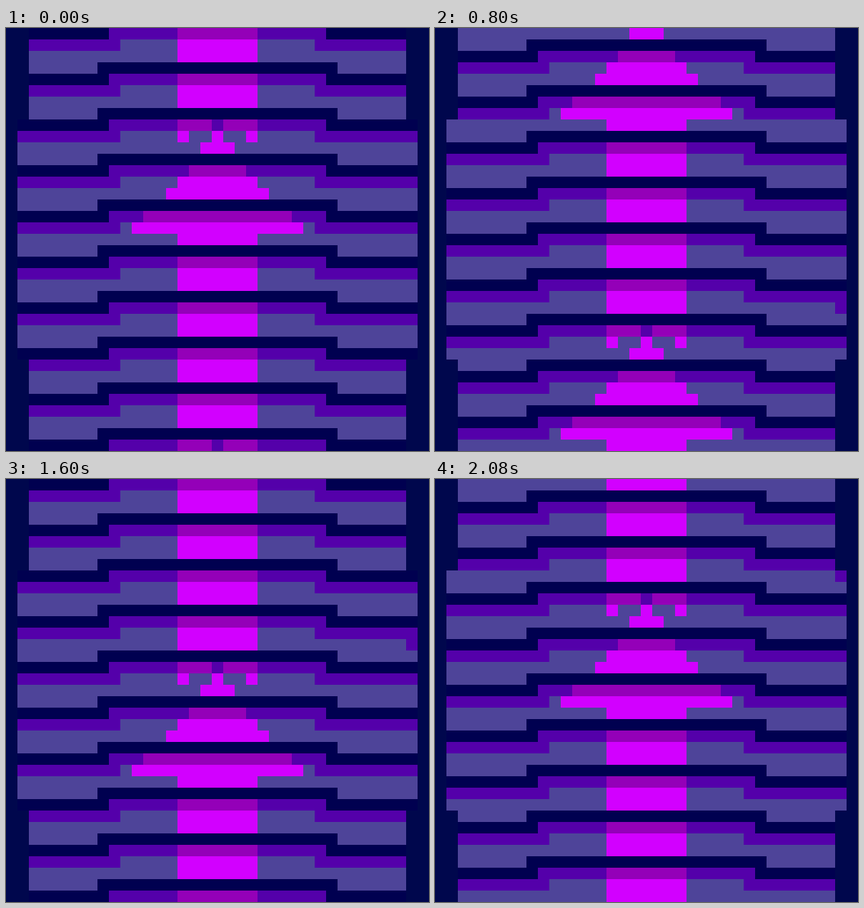
Recreate the animation shown at these times as an HTML page with a canvas. Size 592 by 592 pixels, loop 2.24 s.

```html
<!DOCTYPE html>
<html>
<head>
<meta charset="utf-8">
<style>
html, body { margin: 0; width: 100%; height: 100%; overflow: hidden; background: #00074d; }
canvas { display: block; }
</style>
</head>
<body>
<canvas width="592" height="592"></canvas>
<script>
const ctx = document.querySelector('canvas').getContext('2d');
const CELL = 16, MID = 18, STEP_MS = 160, STEPS = 14, PERIOD = 28;
const BACK = '#00074d', DARK = '#000050', PURPLE = '#5400aa', SLATE = '#4e4499';
const DIM = '#9400b8', BRIGHT = '#d200ff';

// One stair: lit edge, lip, tread, shadow; half is the reach of the middle part
const stair = [
  { side: DARK, middle: PURPLE, half: 9, carpet: DIM },
  { side: PURPLE, middle: SLATE, half: 8, carpet: BRIGHT },
  { side: SLATE, middle: SLATE, half: 8, carpet: BRIGHT },
  { side: SLATE, middle: DARK, half: 10 }
];
const TIP = 9, BASE = 17, SHAFT = 3, SLOPE = 0.82;

// A sloping head, and a shaft that is notched around the next arrow's tip
function inArrow(row, dist) {
  const head = row >= TIP && row <= BASE && dist <= Math.round((row - TIP) * SLOPE);
  const shaft = dist <= SHAFT && (row > BASE || dist > 2 * (row - TIP + 1));
  return head || shaft;
}

function colorAt(x, y, row) {
  const dist = Math.abs(x - MID);
  const wide = Math.abs(y - MID) <= 10;
  if (dist > (wide ? 17 : 16)) return BACK;
  if (x === 35 && row === 6) return PURPLE; // nick in the right edge
  const { side, middle, half, carpet } = stair[row % 4];
  if (carpet && inArrow(row, dist)) return carpet;
  return dist <= half ? middle : side;
}

function draw(step) {
  for (let y = 0; y <= 2 * MID; y++) {
    const row = (y + 2 * step) % PERIOD;
    for (let x = 0; x <= 2 * MID; x++) {
      ctx.fillStyle = colorAt(x, y, row);
      ctx.fillRect(x * CELL, y * CELL, CELL, CELL);
    }
  }
}

function tick() {
  draw(Math.floor(performance.now() / STEP_MS) % STEPS);
  requestAnimationFrame(tick);
}
tick();
</script>
</body>
</html>
```
